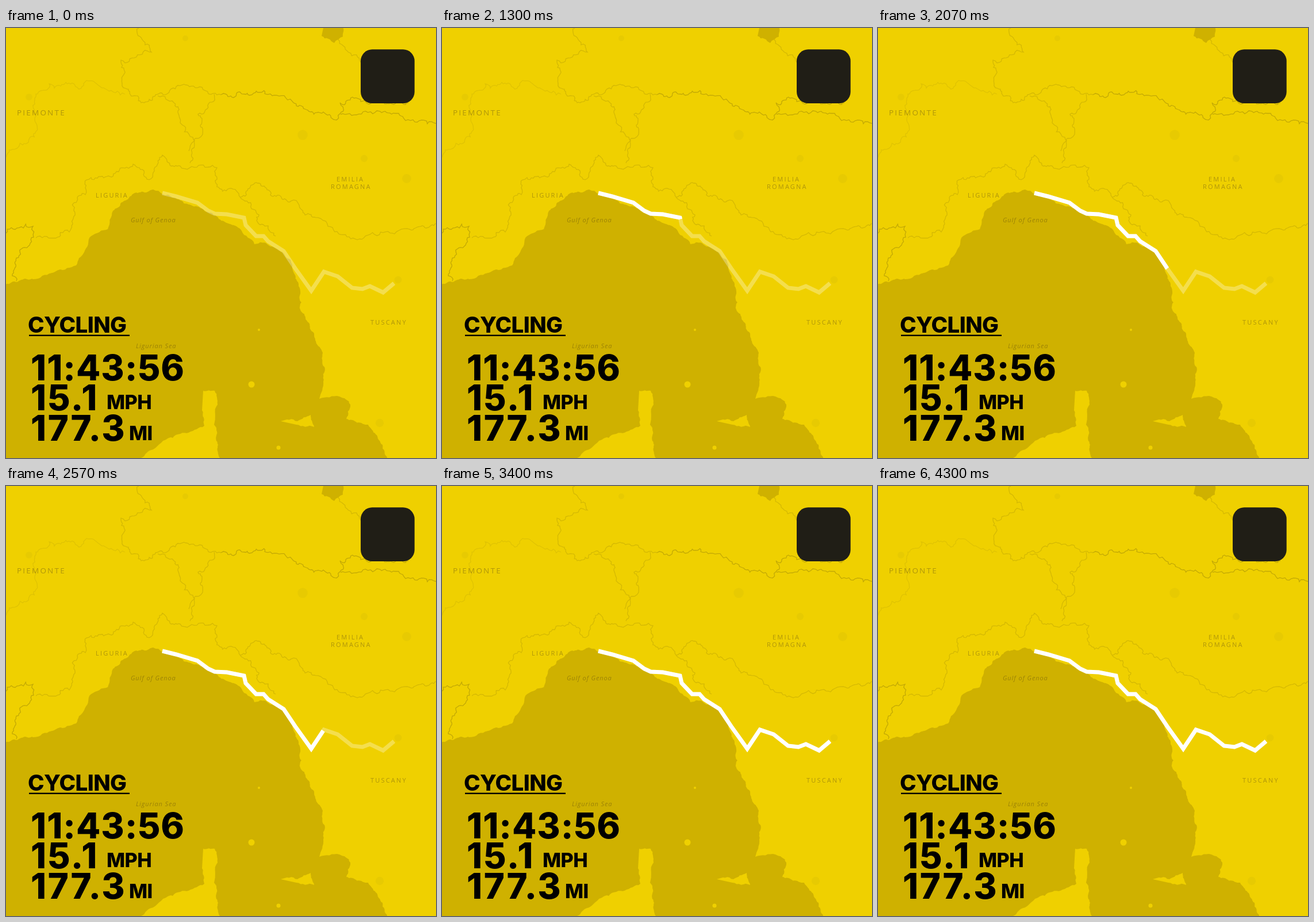
An HTML page for the animation above (4.91 s loop, 748x748 px).

```html
<!DOCTYPE html>
<html lang="en">
<head>
<meta charset="utf-8">
<title>Cycling route</title>
<style>
  html, body { margin: 0; width: 100%; height: 100%; overflow: hidden; background: #efd000; }
  svg { display: block; width: 100vw; height: 100vh; }
  .border { fill: none; stroke: #d5b903; stroke-width: 1.3; }
  .dark { stroke: #c3a905; }
  .faint { stroke: #e0c303; }
  .route { fill: none; stroke: #fff; stroke-width: 7; }
  .label { font: 11px "Open Sans", "Noto Sans", sans-serif; letter-spacing: 2.2px; fill: #b0960a; }
  .water { font-style: italic; letter-spacing: .9px; fill: #9c8306; }
  .big { font: 800 61.5px Inter, "Open Sans", sans-serif; letter-spacing: 1px; }
  .wide { letter-spacing: 2.5px; }
  .unit { font: 800 34px Inter, "Open Sans", sans-serif; letter-spacing: -.5px; }
  .title { font: 800 38.5px Inter, "Open Sans", sans-serif; letter-spacing: -.6px; }
</style>
</head>
<body>
<svg viewBox="0 0 748 748">
  <rect width="748" height="748" fill="#efd000"/>
  <g id="map"></g>
  <g class="label">
    <text x="19" y="152" style="font-size:13.5px">PIEMONTE</text>
    <text x="156" y="295">LIGURIA</text>
    <text x="575" y="267">EMILIA</text>
    <text x="565" y="280">ROMAGNA</text>
    <text x="634" y="516">TUSCANY</text>
    <text class="water" x="217" y="338">Gulf of Genoa</text>
    <text class="water" x="226" y="557">Ligurian Sea</text>
  </g>
  <path class="route" id="ghost" stroke-opacity=".3"/>
  <path class="route" id="ride" pathLength="1"/>
  <rect x="617" y="37.3" width="93.7" height="93.7" rx="20" fill="#201e16"/>
  <text class="title" x="38" y="529.5">CYCLING</text>
  <rect x="40" y="533.6" width="175" height="2.4"/>
  <g class="big">
    <text x="43" y="612.5">11:43:56</text>
    <text x="43" y="665" class="wide">15.1</text>
    <text x="43" y="718" class="wide">177.3</text>
  </g>
  <g class="unit">
    <text x="175" y="663">MPH</text>
    <text x="214" y="717">MI</text>
  </g>
</svg>
<script>
const LOOP = 4910, STEP = 100 / 3, FIRST = 12, STEPS = 90;
const LAND = '#efd000', SEA = '#cfb100', TOWN = '#e7ca02';
const $ = id => document.getElementById(id);

let seed = 7;
const rand = () => (seed = seed * 16807 % 2147483647) / 2147483647 - 0.5;
const parse = s => s.split(' ').map(p => p.split(',').map(Number));
const line = pts => 'M' + pts.map(p => p.map(v => v.toFixed(1))).join('L');

// Midpoint displacement: splits a segment until its parts are short
function split(a, b, amount) {
  const dx = b[0] - a[0], dy = b[1] - a[1], len = Math.hypot(dx, dy);
  if (len < 5) return [b];
  const k = rand() * amount * Math.min(len, 18) / len;
  const mid = [(a[0] + b[0]) / 2 + dy * k, (a[1] + b[1]) / 2 - dx * k];
  return [...split(a, mid, amount), ...split(mid, b, amount)];
}
const rough = (pts, amount) =>
  pts.flatMap((p, i) => i ? split(pts[i - 1], p, amount) : [p]);

function add(tag, attrs) {
  const el = document.createElementNS('http://www.w3.org/2000/svg', tag);
  for (const k in attrs) el.setAttribute(k, attrs[k]);
  $('map').append(el);
}
const area = (s, fill) => add('path', { d: line(rough(parse(s), 0.3)) + 'Z', fill });
const border = (s, kind = '') =>
  add('path', { d: line(rough(parse(s), 0.65)), class: 'border ' + kind });
const spot = (cx, cy, r, fill) => add('circle', { cx, cy, r, fill });

for (const [x, y] of parse('312,18 516,186 623,227 40,120 697,262 650,687 682,438'))
  spot(x, y, 7 + rand() * 4, TOWN);

// Sea, islands, lake
area('-20,452 60,434 122,413 136,390 148,362 177,350 186,318 218,292 256,281 290,295 330,310 370,332 410,353 432,376 452,374 495,403 506,440 512,490 530,525 551,565 552,615 545,645 580,641 599,655 592,680 630,690 655,725 675,770 -20,770', SEA);
area('343,631 363,631 368,655 362,690 375,770 210,770 250,735 290,713 345,692 341,665', LAND);
area('478,684 507,684 530,673 536,694 505,690', LAND);
area('553,-5 588,-5 586,15 571,26 549,14', SEA);
spot(427, 620, 5.5, LAND);
spot(440, 525, 2, LAND);
spot(474, 730, 3.5, LAND);

border('0,225 52,180 50,125 75,97 155,95 207,115', 'faint');
border('231,0 253,42 200,56 208,105 235,130 271,113 319,102 374,116');
border('374,116 440,112 500,130 575,160 581,130 617,128 700,130', 'dark');
border('582,150 645,144 690,154 748,166', 'dark');
border('578,20 617,60');
border('362,115 334,150 342,185 318,214');
border('264,118 292,130 303,165 325,190 320,235');
border('0,357 47,345 48,364 18,400 18,440', 'dark');
border('52,365 110,355 118,318 138,290 148,260 232,243 245,263 272,221 303,240 367,243 365,270 405,288 440,325 436,335 469,362');
border('408,294 438,270 470,293 505,300 560,345 615,367 676,358 712,348 748,340');

const route = line(parse('272,287 296,293 333,304 352,318 363,323 384,324 414,330 417,343 435,362 448,362 456,371 483,388 503,418 531,457 553,424 577,432 602,452 620,454 633,449 656,460 675,444'));
$('ghost').setAttribute('d', route);
$('ride').setAttribute('d', route);

const start = performance.now();
function draw() {
  const t = Math.max(0, performance.now() - start) % LOOP;
  const step = Math.floor((t + 3.4) / STEP);
  const p = Math.min(1, Math.max(0, (step - FIRST) / STEPS));
  const ride = $('ride');
  ride.style.display = p ? '' : 'none';
  ride.setAttribute('stroke-dasharray', p < 1 ? `${p} 2` : 'none');
  requestAnimationFrame(draw);
}
draw();
</script>
</body>
</html>
```
